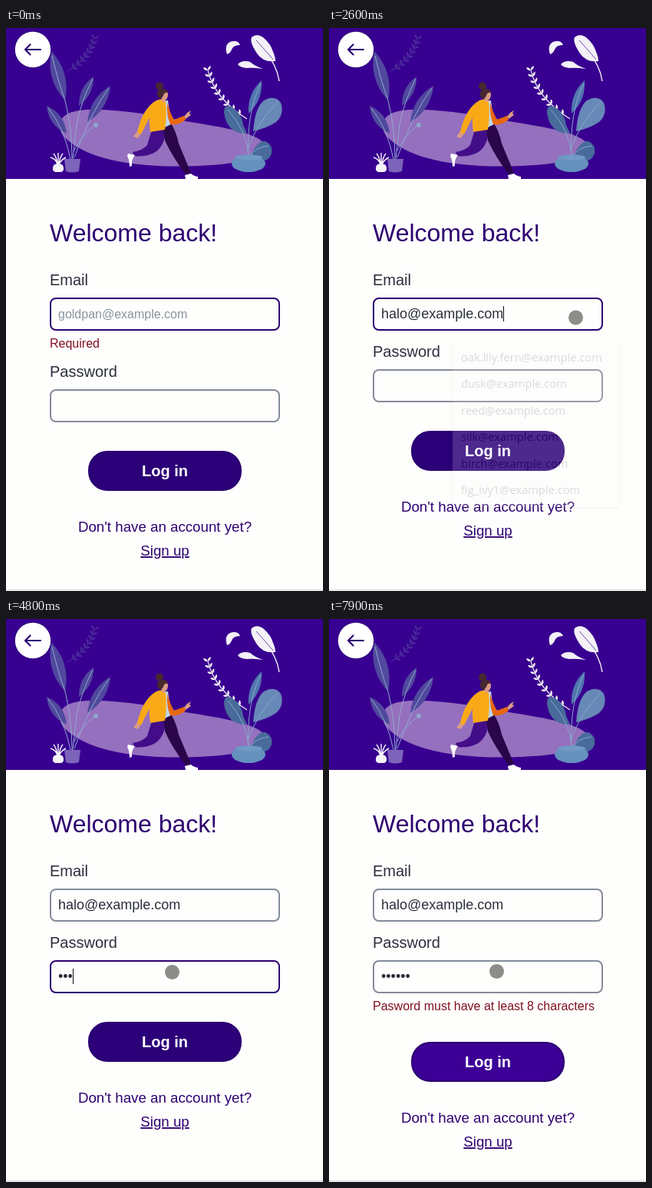
Animation of 413x731 px, one loop 8 s. Source, as an HTML page:

```html
<!DOCTYPE html>
<html lang="en">
<head>
<meta charset="utf-8">
<title>Login form</title>
<style>
  html, body { margin: 0; width: 100%; height: 100%; overflow: hidden; background: #fefefd; }
  svg { display: block; width: 100%; height: 100%; }
  text { font: 20px "Liberation Sans", Arial, sans-serif; fill: #2b2f3a; white-space: pre; }
  .title { font-size: 32px; fill: #2e0070; }
  .value { font-size: 18px; }
  .hint { font-size: 16px; fill: #87949c; }
  .error { font-size: 16px; fill: #800f20; }
  .link { font-size: 18.72px; fill: #2e0070; text-anchor: middle; }
  .underlined { text-decoration: underline 1px; text-underline-offset: 2px; }
  .login { font-weight: bold; fill: #fff; text-anchor: middle; }
  .field { fill: #fefefd; stroke: #858c98; stroke-width: 2; }
  .field.focus { stroke: #2e0070; }
  .popup { filter: drop-shadow(0 1px 2px rgba(0, 0, 0, .35)); }
  .popup text { font-family: "Open Sans", "Noto Sans", sans-serif; }
  .menu text { font-size: 14.7px; fill: #222; }
  .tip text { font-size: 14.5px; fill: #949494; }
</style>
</head>
<body>
<svg viewBox="0 0 413 731">
  <rect width="413" height="196" fill="#380090"/>
  <path fill="#9570be" d="M70 128C70 112 86 106 112 106C158 106 194 114 240 122C292 130 338 139 338 155C338 169 302 177 250 179C205 181 158 178 125 168C98 160 70 144 70 128Z"/>
  <g id="plants"></g>

  <g id="pots">
    <path fill="#7d63b9" d="M76 170H97L95 186Q86 189 78 186Z"/>
    <path fill="#f6f3f8" d="M62 178Q68 174 74 178Q77 185 72 187H64Q59 185 62 178Z"/>
    <path fill="none" stroke="#f6f3f8" stroke-width="1.4" d="M67 177Q65 170 58 168M67 177Q66 168 62 163M68 177V162M69 177Q70 168 74 163M69 177Q72 171 78 168"/>
    <ellipse cx="316" cy="176" rx="22" ry="11" fill="#6591be"/>
    <ellipse cx="316" cy="168" rx="18" ry="3.5" fill="#7099c4"/>
  </g>

  <g id="runner">
    <path fill="#430d8a" d="M190 132L208 132Q207 154 193 162Q180 168 167 166L165 161Q178 159 184 152Z"/>
    <path fill="#fff" d="M159 163L168 165Q163 171 164 179L161 180Q161 172 158 166Z"/>
    <path fill="#2b0549" d="M205 130L215 124Q222 135 225 150L241 188L234 190Q216 166 207 146Z"/>
    <path fill="#fff" d="M233 191L241 189Q244 192 250 193V196H234Z"/>
    <path fill="#bcd6e8" d="M204 95L211 94L215 125L205 130Z"/>
    <path fill="#e8680f" d="M210 97Q214 111 219 119L232 114L234 119Q224 127 214 125Q209 114 210 97Z"/>
    <path fill="#d99a86" d="M232 115L236 110L241 107L239 111L241 113L234 118ZM171 134L176 137L172 143L166 141Z"/>
    <path fill="#faa916" d="M196 94Q204 90 208 96Q210 115 207 132L188 135Q186 122 187 116L176 138L171 135Q178 104 196 94Z"/>
    <path fill="#d99a86" d="M202 88H208V95L203 96Z"/>
    <ellipse cx="206.5" cy="87" rx="4.5" ry="6.5" fill="#d99a86"/>
    <circle cx="200" cy="75.5" r="5" fill="#46292f"/>
    <path fill="#46292f" d="M197 84Q199 78 206 79Q211 80 211 84Q206 83 205 88L202 92Q196 90 197 84Z"/>
  </g>

  <circle cx="35" cy="28" r="24" fill="#2b0078"/>
  <circle cx="35" cy="28" r="23.2" fill="#fff"/>
  <path fill="none" stroke="#2b0070" stroke-width="2.2" stroke-linecap="round" stroke-linejoin="round" d="M45 28H25M31.5 21.5L25 28L31.5 34.5"/>

  <text class="title" x="57" y="277">Welcome back!</text>
  <text x="57" y="334">Email</text>
  <rect id="emailField" class="field" x="58" y="351" width="298" height="41" rx="7"/>
  <text id="email" x="68" y="377"></text>
  <text id="required" class="error" x="57" y="415">Required</text>

  <g id="passwordGroup">
    <text x="57" y="427">Password</text>
    <rect id="passwordField" class="field" x="58" y="444" width="298" height="41" rx="7"/>
    <text id="password" class="value" x="68" y="470"></text>
  </g>
  <text id="tooShort" class="error" x="57" y="508">Pasword must have at least 8 characters</text>

  <g id="actions">
    <rect id="button" x="108" y="524" width="198" height="50" rx="24" stroke="#2b0070" stroke-width="2"/>
    <text class="login" x="207" y="556">Log in</text>
    <rect id="tap" x="108" y="523" width="198" height="52" fill="rgba(50,160,250,.22)"/>
    <text class="link" x="207" y="628">Don't have an account yet?</text>
    <text class="link underlined" x="207" y="659">Sign up</text>
  </g>
  <rect y="729" width="413" height="1.5" fill="#dedede"/>
  <rect id="caret" width="1" height="20" fill="#111"/>

  <g id="menu" class="popup menu">
    <rect x="161" y="405" width="218" height="217" rx="2" fill="#fdfdf8"/>
  </g>
  <g id="tip" class="popup tip">
    <path fill="#f8f8f8" d="M37 494H58L66 487L74 494H403Q406 494 406 497V536Q406 539 403 539H37Q34 539 34 536V497Q34 494 37 494Z"/>
    <circle cx="54" cy="517" r="8" fill="#4285f4"/>
    <text x="74" y="522.5">Use passwords saved in your Quombe Account</text>
  </g>
  <circle id="pointer" r="9.5" fill="rgba(70,70,66,.62)"/>
</svg>

<script>
const $ = id => document.getElementById(id);
const LOOP = 8000, STEP = 100;

function add(parent, tag, attributes) {
  const node = document.createElementNS("http://www.w3.org/2000/svg", tag);
  for (const key in attributes) node.setAttribute(key, attributes[key]);
  return parent.appendChild(node);
}

const plants = $("plants");

function shape(d, fill) {
  add(plants, "path", { d, fill });
}

function stem(d, stroke, width = 1.1) {
  add(plants, "path", { d, stroke, fill: "none", "stroke-width": width });
}

// A pointed leaf from base to tip, widest in the middle.
function leaf(x1, y1, x2, y2, width, fill) {
  const dx = x2 - x1, dy = y2 - y1, length = Math.hypot(dx, dy);
  const nx = -dy / length * width, ny = dx / length * width;
  const cx = (x1 + x2) / 2, cy = (y1 + y2) / 2;
  shape(`M${x1} ${y1}Q${cx + nx} ${cy + ny} ${x2} ${y2}Q${cx - nx} ${cy - ny} ${x1} ${y1}Z`, fill);
}

// Pairs of small leaves along a quadratic stem, pointing back to its start.
function sprig([x0, y0, cx, cy, x1, y1], pairs, size, color) {
  stem(`M${x0} ${y0}Q${cx} ${cy} ${x1} ${y1}`, color);
  for (let i = 0; i < pairs; i++) {
    const u = i / pairs, v = 1 - u;
    const x = v * v * x0 + 2 * u * v * cx + u * u * x1;
    const y = v * v * y0 + 2 * u * v * cy + u * u * y1;
    const angle = Math.atan2(v * (y0 - cy) + u * (cy - y1), v * (x0 - cx) + u * (cx - x1));
    for (const side of [-.8, .8])
      leaf(x, y, x + size * Math.cos(angle + side), y + size * Math.sin(angle + side), size * .4, color);
  }
}

function drawPlants() {
  const dusk = "#50499d", pale = "#8fa9cd", white = "#f4f1f7", blue = "#6888b8", teal = "#486b9b";
  sprig([115, 14, 108, 40, 80, 56], 8, 7, "#49299a");
  leaf(77, 94, 59, 30, 17, dusk);
  leaf(95, 101, 114, 63, 11, dusk);
  leaf(106, 122, 136, 75, 14, dusk);
  leaf(79, 137, 53, 101, 13, dusk);
  stem("M60 36Q68 70 77 94Q86 130 86 170M113 66Q98 95 92 125L87 170M134 78Q110 110 89 168M55 104Q76 130 84 170M88 160Q100 138 115 127", pale, 1);
  add(plants, "circle", { cx: 117, cy: 126, r: 3, fill: pale });

  shape("M351 43Q335 45 327 33Q317 18 320 12Q327 6 336 13Q345 21 348 31Q351 38 351 43Z", white);
  shape("M288 34Q284 22 292 18Q302 15 305 22Q296 22 294 28Q292 33 288 34Z", white);
  shape("M302 47Q308 41 318 44Q325 50 335 53Q320 51 313 52Q304 51 302 47Z", white);
  stem("M337 30Q353 48 356 69", white, 1.4);
  stem("M326 16Q338 29 348 41", "#380090", .7);
  sprig([263, 55, 272, 92, 314, 118], 9, 7, white);

  shape("M314 137Q288 138 284 110Q284 98 293 102Q307 110 309 126Z", teal);
  shape("M318 169Q326 146 338 147Q348 152 346 163Q342 174 331 172Z", teal);
  leaf(316, 111, 333, 68, 11, "#5276af");
  shape("M322 134Q324 104 336 94Q350 86 358 97Q363 112 352 122Q340 130 322 134Z", blue);
  stem("M332 72Q313 110 316 168M354 96Q328 122 316 155M289 106Q314 134 316 165M342 153Q322 155 317 169", "#85a9cc", 1);
}

function drawMenu() {
  const names = ["oak.lily.fern", "dusk", "reed", "silk", "birch", "fig_ivy1"];
  names.forEach((name, i) => {
    add($("menu"), "text", { x: 172, y: 433 + i * 34.4 }).textContent = name + "@example.com";
  });
}

// [time, x, y]
const pointerPath = [
  [700, 373, 376], [800, 338, 376], [900, 321.5, 376], [2800, 321.5, 376],
  [3000, 244, 436], [3100, 216.5, 458.5], [5900, 216.5, 458.5], [6300, 222, 546],
  [6500, 218.5, 538.5], [7400, 218.5, 538.5], [7500, 219, 556], [7800, 214, 453], [7900, 218.5, 457.5]
];
const menuFade = [[0, 0], [1500, .5], [1600, 1], [2400, .75], [2500, .4], [2600, .16], [2900, 0]];
const tipFade = [[0, 0], [3900, 1], [4300, .5], [4400, .1], [4800, 0]];
const keyTimes = [4300, 4400, 4800, 5000, 5200, 5400];
const caretOn = [[1100, 1600], [2100, 2900], [3400, 4100], [4300, 5900], [6400, 6900]];

const held = (steps, t) => steps.filter(([start]) => start <= t).pop()[1];

function pointerAt(t) {
  const next = pointerPath.findIndex(([time]) => time > t);
  if (next < 0) return pointerPath.at(-1).slice(1);
  const [t0, x0, y0] = pointerPath[next - 1], [t1, x1, y1] = pointerPath[next];
  const u = (t - t0) / (t1 - t0);
  return [x0 + (x1 - x0) * u, y0 + (y1 - y0) * u];
}

function show(id, visible) { $(id).style.display = visible ? "" : "none"; }
function shift(id, y) { $(id).setAttribute("transform", `translate(0 ${y})`); }

function render(t) {
  const filled = t >= 2400, inPassword = t >= 3900 && t < 6900, submitted = t >= 6900;
  const dots = keyTimes.filter(time => time <= t).length;

  $("email").textContent = filled ? "halo@example.com" : "goldpan@example.com";
  $("email").setAttribute("class", filled ? "value" : "hint");
  $("password").textContent = "•".repeat(dots);
  $("emailField").classList.toggle("focus", t < 3900);
  $("passwordField").classList.toggle("focus", inPassword);

  show("required", !filled);
  show("tooShort", submitted);
  shift("passwordGroup", filled ? 0 : 26);
  shift("actions", filled && !submitted ? 0 : 26);
  $("button").setAttribute("fill", submitted ? "#3c0096" : "#2b0078");
  show("tap", submitted && t < 7000);

  show("caret", caretOn.some(([from, to]) => t >= from && t < to));
  $("caret").setAttribute("x", inPassword ? 68 + Math.round(dots * 6.3) : filled ? 227 : 68);
  $("caret").setAttribute("y", inPassword ? 454 : 361);

  $("menu").style.opacity = held(menuFade, t);
  $("tip").style.opacity = held(tipFade, t);

  show("pointer", t >= 700);
  if (t >= 700) {
    const [x, y] = pointerAt(t);
    $("pointer").setAttribute("cx", x);
    $("pointer").setAttribute("cy", y);
  }
}

drawPlants();
drawMenu();
const start = performance.now();
function tick() {
  const t = (performance.now() - start) % LOOP;
  render(Math.floor(t / STEP) * STEP);
  requestAnimationFrame(tick);
}
tick();
</script>
</body>
</html>
```
